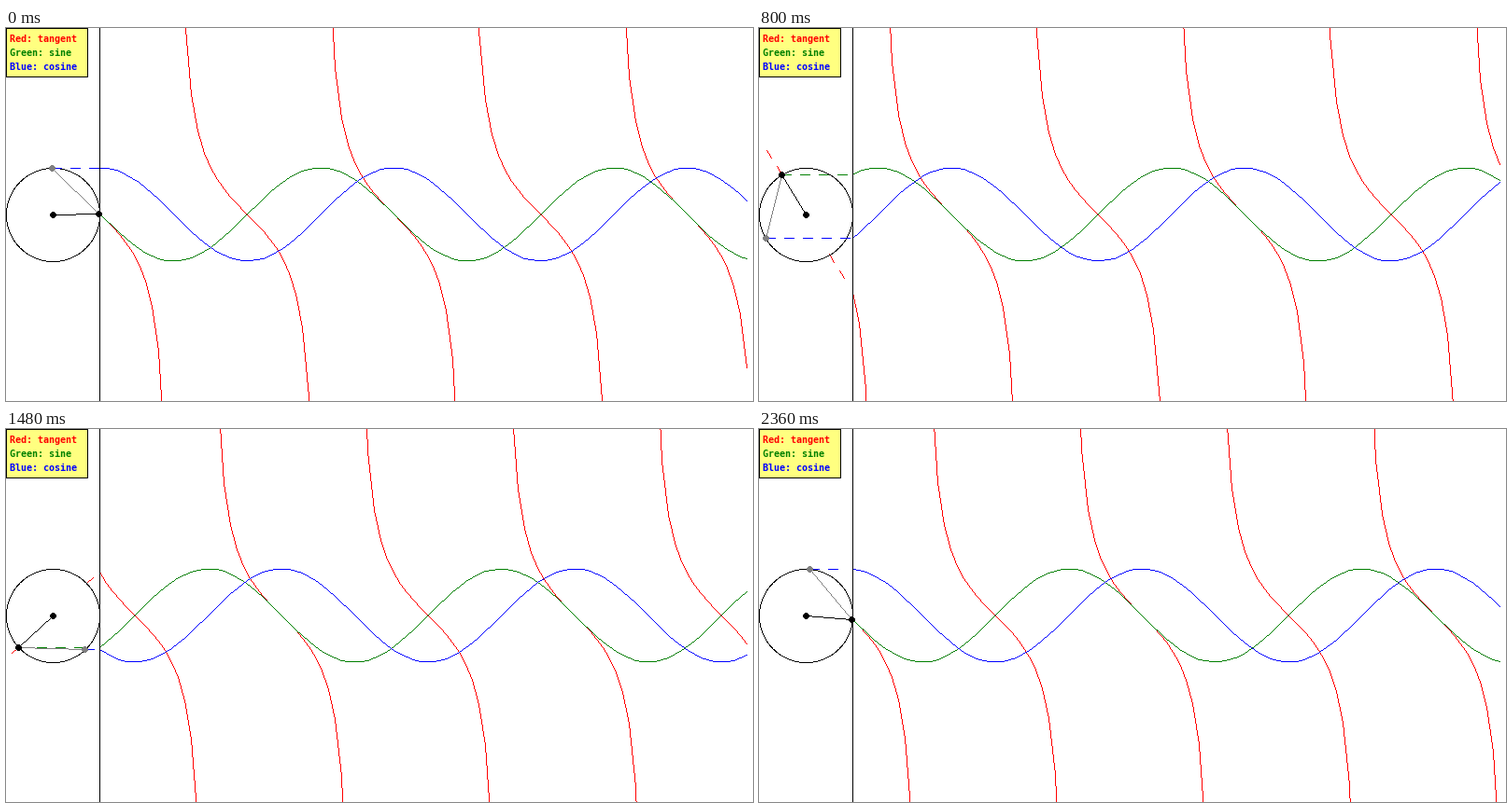
These frames come from a looping animation (800x400 px, 2.4 s). A matplotlib script:

```python
import numpy as np
import matplotlib.pyplot as plt
from matplotlib.animation import FuncAnimation

W, H, DPI = 800, 400, 100
FRAMES, INTERVAL = 60, 40
CX, CY, R = 50, 200, 50
AXIS_X = 100
DASH = 10
WHITE, BLACK, GRAY = (255, 255, 255), (0, 0, 0), (128, 128, 128)
RED, GREEN, BLUE = (255, 0, 0), (0, 128, 0), (0, 0, 255)
YELLOW = (255, 255, 128)

canvas = np.empty((H, W, 3), dtype=np.uint8)
grid_y, grid_x = np.mgrid[:H, :W]
wave_x = np.arange(AXIS_X, 794, 7)

fig = plt.figure(figsize=(W / DPI, H / DPI), dpi=DPI, facecolor="white")
ax = fig.add_axes([0, 0, 1, 1])
ax.axis("off")
image = ax.imshow(canvas, interpolation="nearest", aspect="auto")
for row, (label, color) in enumerate([("Red: tangent", RED),
                                      ("Green: sine", GREEN),
                                      ("Blue: cosine", BLUE)]):
    ax.text(3.5, 14.5 + 15 * row, label, color=np.array(color) / 255,
            family="DejaVu Sans Mono", weight="bold", size=10 * 72 / DPI,
            ha="left", va="baseline")


def segment(a, b, color):
    """One pixel wide line without smoothing."""
    (x0, y0), (x1, y1) = np.trunc(a), np.trunc(b)
    n = int(max(abs(x1 - x0), abs(y1 - y0))) + 1
    x = np.floor(np.linspace(x0, x1, n) + 0.5).astype(int)
    y = np.floor(np.linspace(y0, y1, n) + 0.5).astype(int)
    inside = (x >= 0) & (x < W) & (y >= 0) & (y < H)
    canvas[y[inside], x[inside]] = color


def dashes(start, direction, length, color):
    """Whole dashes only, separated by equal gaps."""
    start, direction = np.array(start), np.array(direction)
    for d in np.arange(0, min(length, 600) - DASH + 1e-6, 2 * DASH):
        segment(start + direction * d, start + direction * (d + DASH), color)


def wave(ys, color, falling=False):
    """Polyline over wave_x; a falling curve breaks wherever it jumps up."""
    points = list(zip(wave_x, np.clip(ys, -1e5, 1e5)))
    for a, b in zip(points, points[1:]):
        if not falling or b[1] >= a[1]:
            segment(a, b, color)


def distance(x, y):
    return np.hypot(grid_x - x, grid_y - y)


def dot(pos, color):
    canvas[distance(*pos) < 3.4] = color


def rim(angle):
    return int(CX + R * np.cos(angle)), int(CY - R * np.sin(angle))


circle_mask = np.abs(distance(CX, CY) - R) < 0.5


def update(i):
    theta = np.radians(6 * i + 1)
    c, s = np.cos(theta), np.sin(theta)
    p, q = rim(theta), rim(theta + np.pi / 2)
    canvas[:] = WHITE

    reach = R / abs(c) - R
    for k in (1, -1):
        dashes((CX + k * R * c, CY - k * R * s), (k * c, -k * s), reach, RED)
    canvas[circle_mask] = BLACK
    dashes(p, (1, 0), AXIS_X - p[0], GREEN)
    dashes(q, (1, 0), AXIS_X - q[0], BLUE)

    phase = theta - (wave_x - AXIS_X) / R
    wave(CY - R * np.tan(phase), RED, falling=True)
    wave(CY - R * np.sin(phase), GREEN)
    wave(CY - R * np.cos(phase), BLUE)
    canvas[:, AXIS_X] = BLACK

    segment(p, q, GRAY)
    segment((CX, CY), p, BLACK)
    dot(q, GRAY)
    dot(p, BLACK)
    dot((CX, CY), BLACK)

    # Legend box
    canvas[:53, :88] = BLACK
    canvas[1:52, 1:87] = YELLOW

    image.set_data(canvas)
    return [image]


anim = FuncAnimation(fig, update, frames=FRAMES, interval=INTERVAL,
                     repeat=True, repeat_delay=0, blit=False)
plt.show()
```
